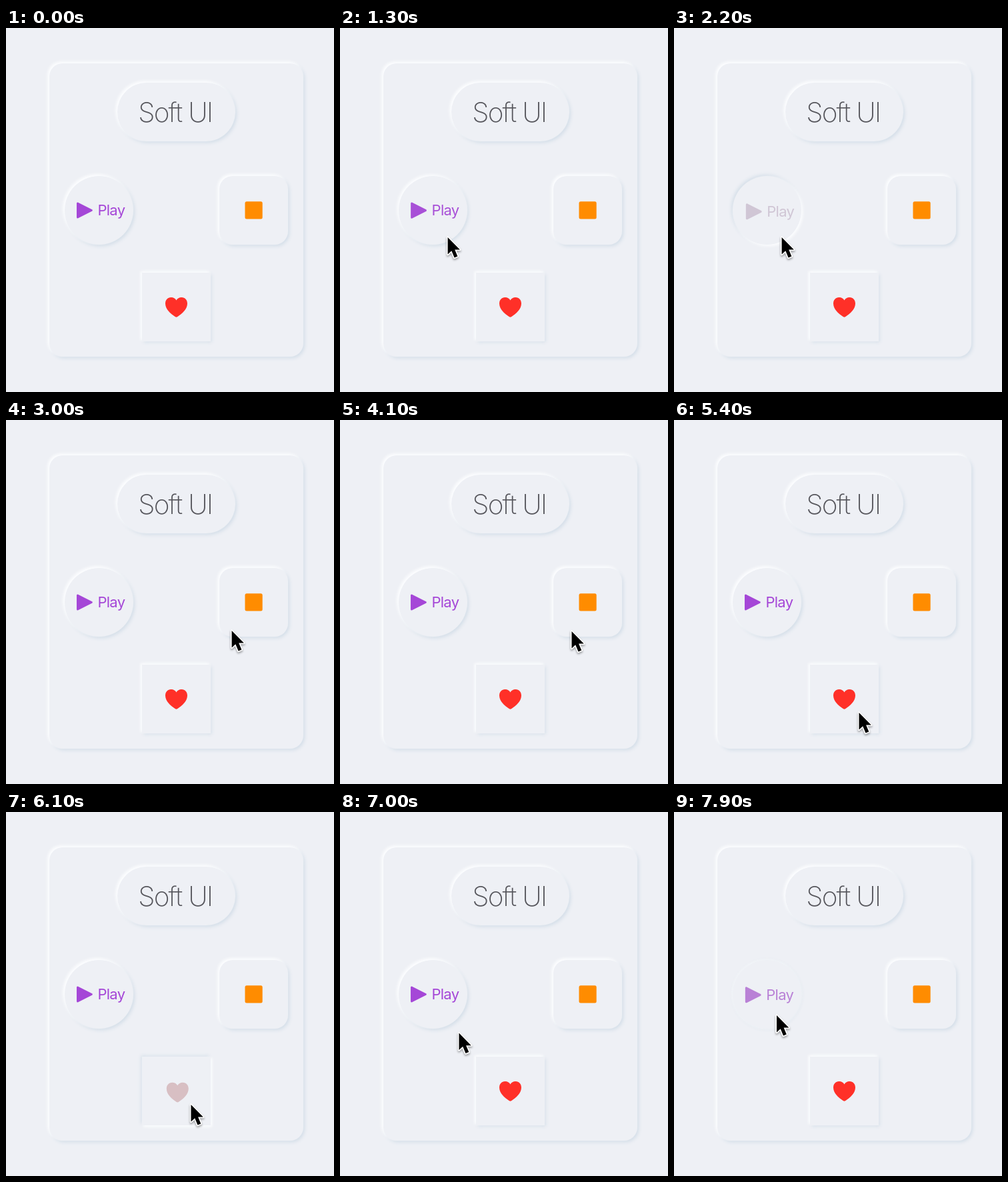
An HTML page for the animation above (8000 ms loop, 492 px wide and 546 px high).

```html
<!DOCTYPE html>
<html lang="en">
<head>
<meta charset="utf-8">
<title>Soft UI</title>
<style>
  html, body { margin: 0; width: 100%; height: 100%; overflow: hidden; background: #eef0f5; }
  #stage { position: relative; width: 492px; height: 546px; overflow: hidden; }
  .soft {
    --d: 2.4px;
    position: absolute;
    box-sizing: border-box;
    background: #eef0f5;
    box-shadow:
      calc(var(--d) * -1) calc(var(--d) * -1) 4px #fdfeff,
      var(--d) var(--d) 5px #d5dfe9;
  }
  #panel { left: 65px; top: 53px; width: 381px; height: 440px; border-radius: 20px; }
  #pill { left: 167px; top: 82px; width: 177px; height: 88px; border-radius: 44px; }
  #play { left: 88px; top: 222px; width: 103px; height: 103px; border-radius: 50%; }
  #stop { left: 320px; top: 222px; width: 103px; height: 103px; border-radius: 20px; }
  #like { left: 204px; top: 367px; width: 103px; height: 103px; }
  svg { position: absolute; left: 0; top: 0; }
  text { font-family: Inter, Roboto, sans-serif; }
  #cursor { filter: drop-shadow(0 2px 1.5px rgba(0, 0, 0, .35)); }
</style>
</head>
<body>
<div id="stage">
  <div class="soft" id="panel"></div>
  <div class="soft" id="pill"></div>
  <div class="soft" id="play"></div>
  <div class="soft" id="stop"></div>
  <div class="soft" id="like"></div>
  <svg width="492" height="546" viewBox="0 0 492 546">
    <text x="198.2" y="141" font-size="40.5" font-weight="200" letter-spacing="-1.75" fill="#55555b">Soft UI</text>
    <g id="playIcon">
      <path d="M107.5 263V284L128.3 273.5Z" fill="currentColor" stroke="currentColor" stroke-width="3" stroke-linejoin="round"/>
      <text x="137.4" y="281" font-size="22" letter-spacing="-.7" fill="currentColor">Play</text>
    </g>
    <g id="stopIcon">
      <rect x="358.5" y="260.2" width="26.2" height="26.2" rx="2.5" fill="currentColor"/>
    </g>
    <g id="likeIcon">
      <path d="M255.5 408.5C257 405.5 260 404 263.3 404C268.5 404 272 408 272 413.3C272 421.5 264.5 428.5 257 433.3Q255.5 434.2 254 433.3C246.5 428.5 239 421.5 239 413.3C239 408 242.5 404 247.7 404C251 404 254 405.5 255.5 408.5Z" fill="currentColor"/>
    </g>
    <g id="cursor">
      <path d="M0 0V25.5L5.7 20.2L10 30.5L14.8 28.5L10.6 18.6H18.3Z" fill="#000" stroke="#fff" stroke-width="3.4" stroke-linejoin="round" paint-order="stroke"/>
    </g>
  </svg>
</div>
<script>
  const LOOP = 8000, STEP = 100, DOWN = 250, UP = 300;
  const DEPTH = 2.4, SHIFT = 2;
  const GRAY = [211, 208, 213];
  const $ = id => document.getElementById(id);

  // presses: [pointer down, pointer up]
  const buttons = [
    { id: "play", color: [165, 71, 215], presses: [[1260, 1600], [1900, 2150], [7400, 7735]] },
    { id: "stop", color: [255, 140, 0], presses: [[3100, 3450], [4250, 4550]] },
    { id: "like", color: [255, 48, 40], presses: [[5650, 6040]] }
  ];

  // cursor tip: [time, x, y]
  const path = [
    [100, 459, 440], [500, 290, 370], [900, 161.6, 314], [2300, 161.6, 314],
    [2800, 338.6, 316], [3000, 338.6, 316], [3400, 347.5, 317], [4900, 347.5, 317],
    [5400, 277.5, 439], [6500, 277.5, 439], [7200, 154, 305], [8000, 154, 305]
  ];

  const clamp = v => Math.min(1, Math.max(0, v));
  const ease = v => { v = clamp(v); return v * v * (3 - 2 * v); };
  const mix = (a, b, k) => a + (b - a) * k;

  function pressure(presses, t) {
    return Math.max(...presses.map(([a, b]) => ease((t - a) / DOWN) - ease((t - b) / UP)));
  }

  function tip(t) {
    const i = Math.max(1, path.findIndex(p => p[0] > t));
    const [a, b] = [path[i - 1], path[i]];
    const k = ease((t - a[0]) / (b[0] - a[0]));
    return [mix(a[1], b[1], k), mix(a[2], b[2], k)];
  }

  function draw(t) {
    for (const { id, color, presses } of buttons) {
      const p = pressure(presses, t), icon = $(id + "Icon");
      $(id).style.setProperty("--d", mix(DEPTH, -DEPTH, p) + "px");
      icon.style.color = `rgb(${color.map((c, i) => Math.round(mix(c, GRAY[i], p)))})`;
      icon.setAttribute("transform", `translate(${SHIFT * p} ${SHIFT * p})`);
    }
    const cursor = $("cursor");
    cursor.style.visibility = t < path[0][0] ? "hidden" : "visible";
    cursor.setAttribute("transform", `translate(${tip(t)})`);
  }

  const start = performance.now();
  function tick() {
    const t = (performance.now() - start) % LOOP;
    draw(Math.floor(t / STEP) * STEP);
    requestAnimationFrame(tick);
  }
  draw(0);
  requestAnimationFrame(tick);
</script>
</body>
</html>
```
